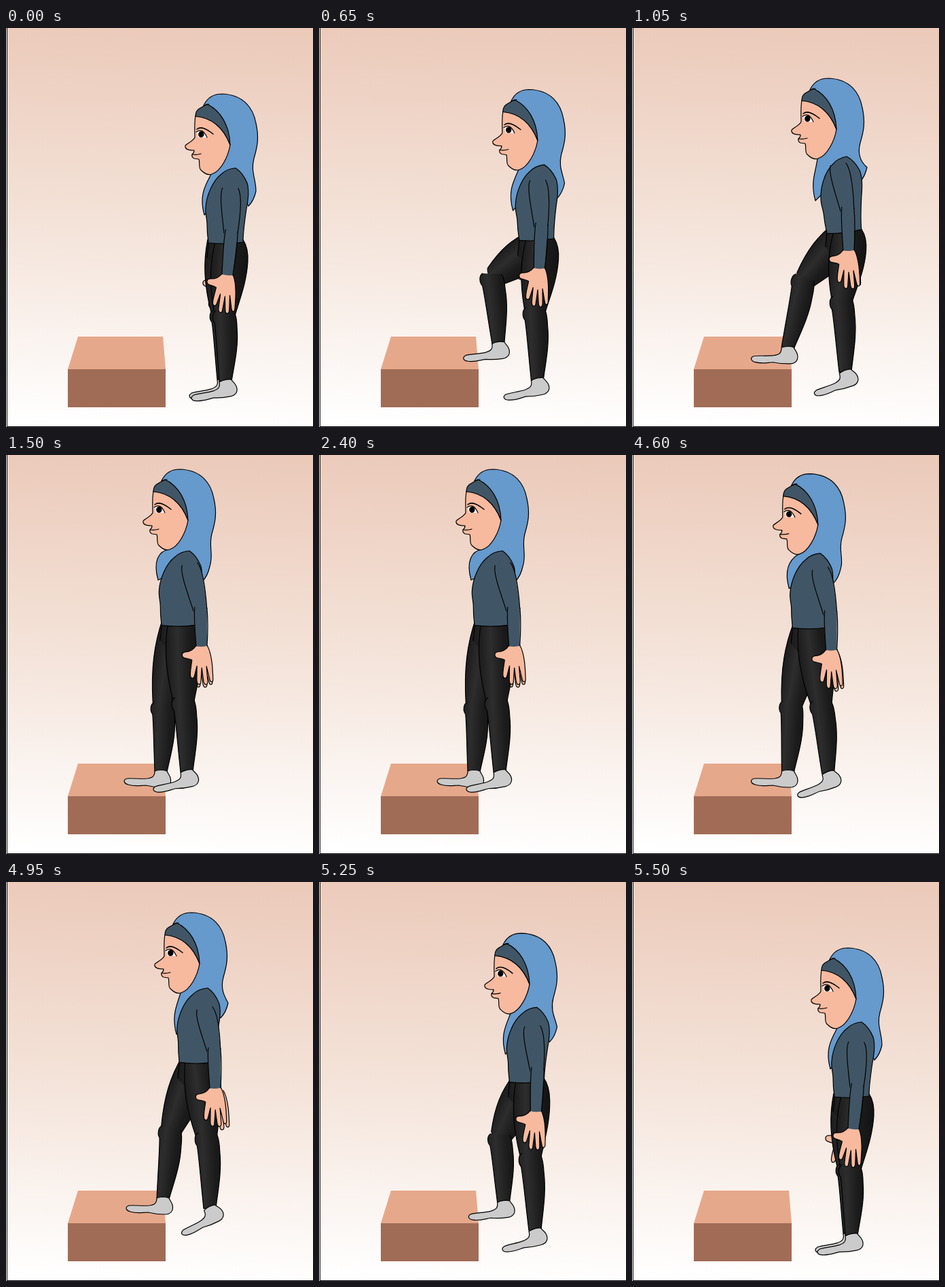
An HTML page with a canvas that plays this animation: 452x587 px, repeating every 7550 ms.

```html
<!DOCTYPE html>
<html lang="en">
<head>
<meta charset="utf-8">
<title>Step-up exercise</title>
<style>
html, body { margin: 0; width: 100%; height: 100%; overflow: hidden; background: #fff; }
canvas { display: block; width: 452px; height: 587px; }
</style>
</head>
<body>
<canvas id="stage" width="452" height="587"></canvas>
<script>
const ctx = document.getElementById('stage').getContext('2d');
const LOOP = 7550, STEP = 50;
const SKIN = '#f7ba9f', HOOD = '#6699cc', SHIRT = '#405666', SOCK = '#cbcbcb';

// Values per pose, in this order: points take two numbers, the rest one.
const FIELDS = ['head', 'neck', 'waist', 'shoulder', 'elbow', 'wrist', 'farWrist',
  'knee', 'ankle', 'farKnee', 'farAnkle', '-foot', '-farFoot', '-tailL', '-tailR'];

const stand = [0,0, 338,206, 323,316, 330,240, 331,302, 326,363, 320,365,
  322,425, 323,520, 318,424, 320,517, -12, -12, 69, 56];
const lift = [-10,-8, 330,200, 319,312, 320,226, 326,290, 324,351, 322,351,
  317,419, 321,517, 240,356, 251,452, -14, -8, 67, 48];
const plant = [-29,-23, 316,189, 312,300, 304,205, 317,268, 319,327, 320,326,
  309,404, 314,506, 252,374, 229,471, -21, -2, 65, 38];
const top1 = [-62,-76, 270,141, 254,251, 271,165, 286,228, 288,281, 287,285,
  262,366, 266,466, 231,373, 228,466, -14, 0, 43, 45];
const top2 = [-62,-76, 270,141, 254,251, 271,165, 286,228, 287,281, 287,285,
  262,366, 266,466, 231,373, 228,466, -14, 0, 43, 45];
const back = [-54,-67, 280,146, 264,257, 280,174, 294,235, 296,289, 298,293,
  286,372, 297,469, 236,371, 230,466, -25, 0, 55, 44];
const reach = [-45,-52, 297,156, 280,267, 293,190, 306,248, 308,303, 312,308,
  296,378, 300,480, 242,369, 231,466, -28, 0, 68, 44];
const lower = [-24,-26, 317,180, 302,290, 311,212, 319,273, 318,332, 317,335,
  310,405, 317,511, 256,369, 262,462, -17, -8, 69, 50];
const end = stand.slice();
end[12] = 315; end[13] = 367;

const KEYS = [[0, stand], [800, lift], [1050, plant], [1500, top1], [4050, top2],
  [4800, back], [4950, reach], [5200, lower], [5500, end], [LOOP, end]];

function poseAt(t) {
  const i = KEYS.findIndex(k => k[0] > t);
  const [t0, a] = KEYS[i - 1], [t1, b] = KEYS[i];
  const u = (t - t0) / (t1 - t0), pose = {};
  let n = 0;
  const next = () => { const v = a[n] + (b[n] - a[n]) * u; n++; return v; };
  for (const f of FIELDS) {
    if (f[0] === '-') pose[f.slice(1)] = next();
    else pose[f] = [next(), next()];
  }
  return pose;
}

const P = d => new Path2D(d);
const shapes = {
  thigh: P('M-20,-14C-27,20 -26,52 -16,94C-10,103 9,104 15,97C20,74 29,48 29,17C29,2 26,-8 20,-16'),
  shin: P('M-13,-9C-19,-6 -19,4 -15,9C-13,24 -12,52 -9,96L9,96C13,72 20,46 18,18C18,6 17,0 15,-5'),
  foot: P('M-9,-1C-9,8 -14,9 -20,10C-30,11 -44,9 -50,10C-56,12 -55,17 -48,19C-38,22 -30,20 -22,20C-14,22 -5,23 3,23C12,23 16,17 14,9C13,5 10,2 9,-1C4,-3 -4,-3 -9,-1Z'),
  pelvis: P('M-25,-3C-25,8 -27,14 -27,22L-8,46L20,40L28,18L25,-3'),
  hand: P('M-8,-1C-12,5 -18,8 -25,8C-31,9 -30,16 -25,17C-21,18 -18,18 -15,20C-16,28 -19,38 -18,44C-17,48 -13,48 -12,43L-8,29L-9,50C-9,58 -3,58 -3,52L-1,32L1,52C2,59 7,58 7,52L6,30L10,49C11,55 15,54 15,49C15,35 15,12 8,-1'),
  torso: P('M0,0C-10,1 -16,4 -21,9C-35,20 -43,42 -44,58C-45,66 -42,75 -42,82C-42,95 -41,102 -40,110Q-14,113 11,109C11,95 13,80 16,60C19,45 20,32 17,22C12,10 6,4 0,0Z'),
  upperArm: P('M-13,2Q-12,-6 0,-6Q12,-6 14,2C16,20 13,45 10,64L-10,64C-11,44 -15,22 -13,2Z'),
  upperLines: P('M-11,-5C-16,4 -13,30 -10,64M12,-4C17,6 15,34 10,64'),
  foreArm: P('M-10,-2L-8,60Q0,62 8,60L10,-2Z'),
  foreLines: P('M-8,-5C-10,10 -9,35 -8,60M10,-3C11,18 10,38 8,60'),
  face: P('M279,129C277,142 278,150 278,161C275,167 266,170 264,173C263,178 268,180 277,180Q277,184 274,186Q273,190 277,192L284,193C286,199 283,205 287,209C292,214 298,217 303,215C316,211 327,190 330,172C320,146 302,132 279,129Z'),
  band: P('M279,130Q279,122 284,119L296,112C315,121 329,142 330,172C320,146 302,132 279,130Z'),
  mouth: P('M274,186Q281,187 287,185M291,114L299,112'),
  eye: P('M281,153C287,149 293,152 296,161L283,161Z'),
  brow: P('M281,149C287,144 295,148 305,156'),
  lid: P('M280,153C286,149 291,150 296,161')
};

function paint(path, fill, line = path, width = 1.2) {
  if (fill) { ctx.fillStyle = fill; ctx.fill(path); }
  if (line) { ctx.lineWidth = width; ctx.stroke(line); }
}

function at([x, y], angle, draw, sy = 1) {
  ctx.save();
  ctx.translate(x, y);
  ctx.rotate(angle);
  ctx.scale(1, sy);
  draw();
  ctx.restore();
}

const tilt = (a, b) => Math.atan2(a[0] - b[0], b[1] - a[1]);
const shift = ([x, y], dx, dy) => [x + dx, y + dy];

// Draws a part whose own length runs down the y axis, laid from a to b.
function bone(a, b, length, ...look) {
  const size = Math.hypot(b[0] - a[0], b[1] - a[1]);
  at(a, tilt(a, b), () => paint(...look), size / length);
}

function gradient(x0, y0, x1, y1, ...colors) {
  const g = ctx.createLinearGradient(x0, y0, x1, y1);
  colors.forEach((c, i) => g.addColorStop(i / (colors.length - 1), c));
  return g;
}
const pants = gradient(-24, 0, 28, 0, '#1c1c1c', '#2d2d2d', '#1b1b1b', '#141414');
const wall = gradient(236, 0, 215, 587, '#ebcaba', '#f4e3d9', '#ffffff');

function polygon(fill, points) {
  paint(P('M' + points + 'Z'), fill, null);
}

function scene() {
  ctx.fillStyle = wall;
  ctx.fillRect(0, 0, 452, 587);
  ctx.fillStyle = '#fff';
  ctx.fillRect(0, 0, 1, 587);
  ctx.fillStyle = '#000';
  ctx.fillRect(1, 0, 1, 587);
  ctx.fillRect(1, 586, 451, 1);
  polygon('#e6a88b', '106,454 231,454 235,502 91,502');
  polygon('#a16c56', '91,502 235,502 235,558 91,558');
}

function leg(hip, knee, ankle, foot) {
  bone(hip, knee, 100, shapes.thigh, pants);
  bone(knee, ankle, 96, shapes.shin, pants);
  at(ankle, foot * Math.PI / 180, () => paint(shapes.foot, SOCK));
}

function head(p) {
  const [dx, dy] = p.head;
  const left = shift(p.neck, -46 - dx, p.tailL - dy);
  const right = shift(p.neck, 19 - dx, p.tailR - dy);
  const inner = shift(p.neck, -dx, 20 - dy);
  const bend = [right[0] + 11, right[1] - 22];
  const hood = P(`M291,114C296,103 305,97 318,97C350,98 364,118 368,140
    C373,162 370,175 365,192C360,211 368,222 ${bend}Q${right[0] + 8},${right[1] - 8} ${right}
    L${inner}L${left}C${left[0] - 8},${left[1] - 28} ${left[0] + 1},${left[1] - 43} 302,215L320,160Z`);
  at(p.head, 0, () => {
    paint(hood, HOOD);
    paint(shapes.face, SKIN);
    paint(shapes.band, SHIRT);
    paint(shapes.mouth);
    paint(shapes.eye, '#fff', null);
    paint(P('M291.5,156.5a4.2,4.5 0 1 1 -8.4,0a4.2,4.5 0 1 1 8.4,0Z'), '#000', null);
    paint(shapes.lid);
    paint(shapes.brow, null, shapes.brow, 1.5);
  });
}

function arm({ shoulder, elbow, wrist }) {
  at(wrist, tilt(elbow, wrist), () => paint(shapes.hand, SKIN));
  bone(shoulder, elbow, 64, shapes.upperArm, SHIRT, shapes.upperLines);
  bone(elbow, wrist, 60, shapes.foreArm, SHIRT, shapes.foreLines);
}

function figure(p) {
  const swing = tilt(p.elbow, p.wrist);
  at(p.farWrist, swing, () => paint(shapes.hand, SKIN));
  leg(shift(p.waist, -6, 9), p.farKnee, p.farAnkle, p.farFoot);
  at(p.waist, 0, () => paint(shapes.pelvis, pants, P('M-25,-3C-25,8 -27,14 -27,22')));
  leg(shift(p.waist, 5, 10), p.knee, p.ankle, p.foot);
  head(p);
  const lean = tilt(p.neck, p.waist) - Math.atan2(15, 110);
  at(p.neck, lean, () => paint(shapes.torso, SHIRT));
  arm(p);
}

function frame() {
  const t = Math.floor(performance.now() % LOOP / STEP) * STEP;
  ctx.strokeStyle = '#000';
  ctx.lineJoin = ctx.lineCap = 'round';
  scene();
  figure(poseAt(t));
  requestAnimationFrame(frame);
}
frame();
</script>
</body>
</html>
```
